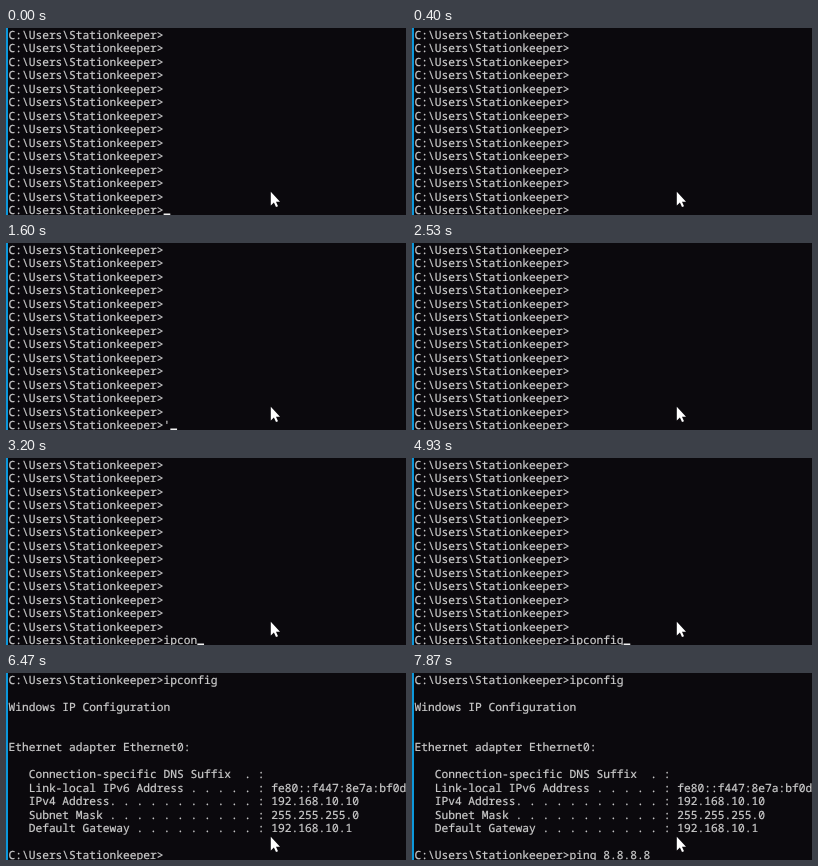
Recreate the animation shown at these times as an HTML page. Size 400 px wide and 187 px high, loop 8 s.

```html
<!DOCTYPE html>
<html lang="en">
<head>
<meta charset="utf-8">
<title>Console</title>
<style>
  html, body { margin: 0; width: 100%; height: 100%; overflow: hidden; background: #0b090d; }
  svg { display: block; width: 100%; height: 100%; }
  text {
    font: 11.243px "Noto Sans Mono", "DejaVu Sans Mono", monospace;
    font-variant-ligatures: none;
    fill: #ccc;
    stroke: #ccc;
    stroke-width: .22px;
    white-space: pre;
    text-rendering: geometricPrecision;
  }
</style>
</head>
<body>
<svg viewBox="0 0 400 187">
  <rect width="400" height="187" fill="#0b090d"/>
  <rect width="2" height="187" fill="#0c98dc"/>
  <g id="rows"></g>
  <rect id="caret" y="185.5" width="6.7" height="1.5" fill="#f2f2f2"/>
  <path d="M264.8 163.8v13.6l3.1-2.9 2.1 4.6 2-.9-2-4.5h4z" fill="#fff"/>
</svg>
<script>
const LOOP = 8000, ROWS = 14;
const LEFT = 2.45, CELL = 6.746, BASE = 10.7, LINE = 13.49;
const PROMPT = 'C:\\Users\\Stationkeeper>';

// Dotted label as the command prints it, with the colon in column 37
const field = (label, dots, value = '') =>
  '   ' + label + ' .'.repeat(dots) + ' : ' + value;

const idle = Array(ROWS - 1).fill(PROMPT);
const report = [
  PROMPT + 'ipconfig',
  '',
  'Windows IP Configuration',
  '',
  '',
  'Ethernet adapter Ethernet0:',
  '',
  field('Connection-specific DNS Suffix ', 1),
  field('Link-local IPv6 Address', 5, 'fe80::f447:8e7a:bf0d'),
  field('IPv4 Address.', 10, '192.168.10.10'),
  field('Subnet Mask', 11, '255.255.255.0'),
  field('Default Gateway', 9, '192.168.10.1'),
  ''
];

// [start ms, typed text, caret visible]
const steps = [
  [0, '', 1], [130, '', 0], [930, '', 1], [1130, '', 0],
  [1600, "'", 1], [1670, "'p", 1], [1870, "'p", 0],
  [2200, '', 1], [2530, '', 0],
  [2670, 'i', 1], [2730, 'ip', 1],
  [3000, 'ipc', 1], [3070, 'ipco', 1], [3200, 'ipcon', 1],
  [3600, 'ipconf', 1], [3870, 'ipconf', 0], [4200, 'ipconf', 1],
  [4930, 'ipconfig', 1],
  [5200, '', 1], [5670, '', 0], [6000, '', 1], [6470, '', 0], [6670, '', 1],
  [7400, 'ping 8.8.8.8', 1], [7870, 'ping 8.8.8.8', 0]
];
const REPORT_AT = 5200;

const caret = document.getElementById('caret');
const group = document.getElementById('rows');
const rows = Array.from({ length: ROWS }, (_, i) => {
  const row = document.createElementNS('http://www.w3.org/2000/svg', 'text');
  row.setAttribute('x', LEFT);
  row.setAttribute('y', BASE + i * LINE);
  return group.appendChild(row);
});

let shown;
function draw(t) {
  const step = steps.findLast(s => s[0] <= t);
  if (step === shown) return;
  shown = step;
  const [, typed, visible] = step;
  const lines = [...(t < REPORT_AT ? idle : report), PROMPT + typed];
  rows.forEach((row, i) => { row.textContent = lines[i]; });
  caret.setAttribute('x', LEFT + lines[ROWS - 1].length * CELL);
  caret.setAttribute('opacity', visible);
}

const start = performance.now();
function tick() {
  draw((performance.now() - start) % LOOP);
  requestAnimationFrame(tick);
}
tick();
</script>
</body>
</html>
```
